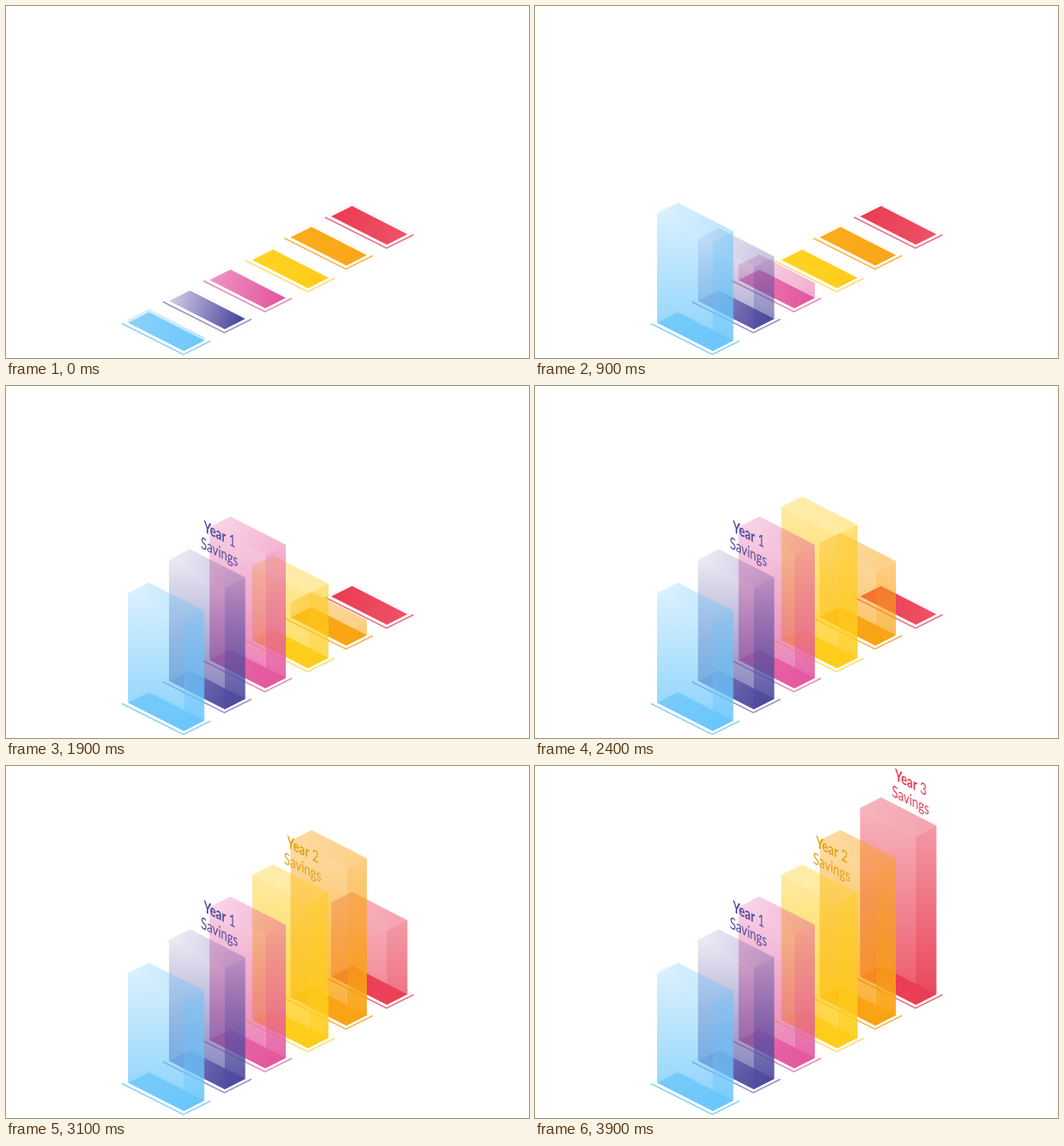
An HTML page with a canvas for the animation above (4100 ms loop, 600 px wide and 404 px high).

```html
<!DOCTYPE html>
<html lang="en">
<head>
<meta charset="utf-8">
<title>Savings by year</title>
<style>
  html, body { margin: 0; width: 100%; height: 100%; overflow: hidden; background: #fff; }
  canvas { display: block; }
</style>
</head>
<body>
<canvas id="stage" width="600" height="404"></canvas>
<script>
const ctx = document.getElementById('stage').getContext('2d');
const LOOP = 4100, STEP = 100, RISE = 13.55;

// x, y: left corner of the base; start: step at which the bar begins to rise;
// base: floor gradient; side and lid: opacity ranges of the faces
const bars = [
  { x: 140, y: 363.5, start: 0, rgb: '104,197,251', base: ['#95d7f8', '#78cafc'], line: '#8bd0f8',
    left: [.26, .78], right: [.46, .9], lid: [.24, .42] },
  { x: 187, y: 338.5, start: 4, rgb: '79,75,159', base: ['#d3cde6', '#4d499e'], line: '#9790c6',
    left: [.12, .72], right: [.26, .96], lid: [.1, .3], label: 'Year 1', ink: '#4f4b9f' },
  { x: 233.5, y: 314.5, start: 8, rgb: '228,88,158', base: ['#ef94c4', '#e2589e'], line: '#e58ab9',
    left: [.28, .78], right: [.4, .92], lid: [.24, .44] },
  { x: 282.5, y: 291.5, start: 13, rgb: '254,205,28', base: ['#ffd324', '#ffcd1b'], line: '#fedd6c',
    left: [.42, .88], right: [.54, .94], lid: [.36, .42], label: 'Year 2', ink: '#dfa30f' },
  { x: 326.5, y: 265.5, start: 18, rgb: '249,163,20', base: ['#fbac1b', '#faa619'], line: '#f8b445',
    left: [.38, .88], right: [.48, .98], lid: [.4, .5] },
  { x: 373, y: 241.5, start: 25, rgb: '233,60,82', base: ['#ea3c53', '#ed5065'], line: '#ec6a82',
    left: [.38, .86], right: [.48, .96], lid: [.38, .46], label: 'Year 3', ink: '#e83a52' }
];

const LEFT = [0, 0], BACK = [24, -12], RIGHT = [87.5, 20.5], FRONT = [64, 32.5];

function path(points) {
  ctx.beginPath();
  for (const [x, y] of points) ctx.lineTo(x, y);
}

function fill(points, style) {
  path(points);
  ctx.fillStyle = style;
  ctx.fill();
}

function gradient(x0, y0, x1, y1, from, to) {
  const g = ctx.createLinearGradient(x0, y0, x1, y1);
  g.addColorStop(0, from);
  g.addColorStop(1, to);
  return g;
}

function stroke(points, color, alpha) {
  path(points);
  ctx.globalAlpha = alpha;
  ctx.strokeStyle = color;
  ctx.lineWidth = 1.4;
  ctx.stroke();
  ctx.globalAlpha = 1;
}

function drawFloor(bar) {
  stroke([[-7, 1], [24, -15], [94.5, 21]], bar.line, .07);
  stroke([[-7, 1], [63.5, 36.5], [94.5, 21]], bar.line, 1);
  fill([LEFT, BACK, RIGHT, FRONT], gradient(0, 0, 80, 24, ...bar.base));
}

// The shading hangs from the lid, so a short bar shows only its pale upper part.
function drawFaces(bar, height, full) {
  const up = ([x, y]) => [x, y - height];
  const tint = ([a, b]) => [`rgba(${bar.rgb},${a})`, `rgba(${bar.rgb},${b})`];
  const shade = range => gradient(0, -height, 0, full + 30 - height, ...tint(range));
  fill([LEFT, up(LEFT), up(FRONT), FRONT], shade(bar.left));
  fill([FRONT, up(FRONT), up(RIGHT), RIGHT], shade(bar.right));
  fill([LEFT, BACK, RIGHT, FRONT].map(up), gradient(0, -height, 75, 26 - height, ...tint(bar.lid)));
}

function drawText(text, weight, x, y) {
  ctx.save();
  ctx.transform(.7, .36, 0, 1, x, y);
  ctx.font = `${weight} 18.5px Lato, sans-serif`;
  ctx.fillText(text, 0, 0);
  const width = ctx.measureText(text).width;
  ctx.restore();
  return width;
}

function drawLabel(bar, full) {
  const [word, number] = bar.label.split(' ');
  const y = -full - 32;
  ctx.fillStyle = bar.ink;
  const width = drawText(word, 'bold', 40, y) + 5;
  drawText(number, 'normal', 40 + width * .7, y + width * .36);
  drawText('Savings', 'normal', 36.5, y + 18.5);
}

function draw(time) {
  const step = Math.floor(time % LOOP / STEP);
  ctx.fillStyle = '#fff';
  ctx.fillRect(0, 0, 600, 404);
  for (let i = bars.length - 1; i >= 0; i--) {
    const bar = bars[i], steps = 9 + i;
    const full = 3.8 + steps * RISE;
    const age = step - bar.start;
    ctx.save();
    ctx.translate(bar.x, bar.y);
    drawFloor(bar);
    if (age >= 0) drawFaces(bar, 3.8 + Math.min(age, steps) * RISE, full);
    if (bar.label && age >= steps) drawLabel(bar, full);
    ctx.restore();
  }
}

function tick() {
  draw(performance.now());
  requestAnimationFrame(tick);
}
tick();
</script>
</body>
</html>
```
